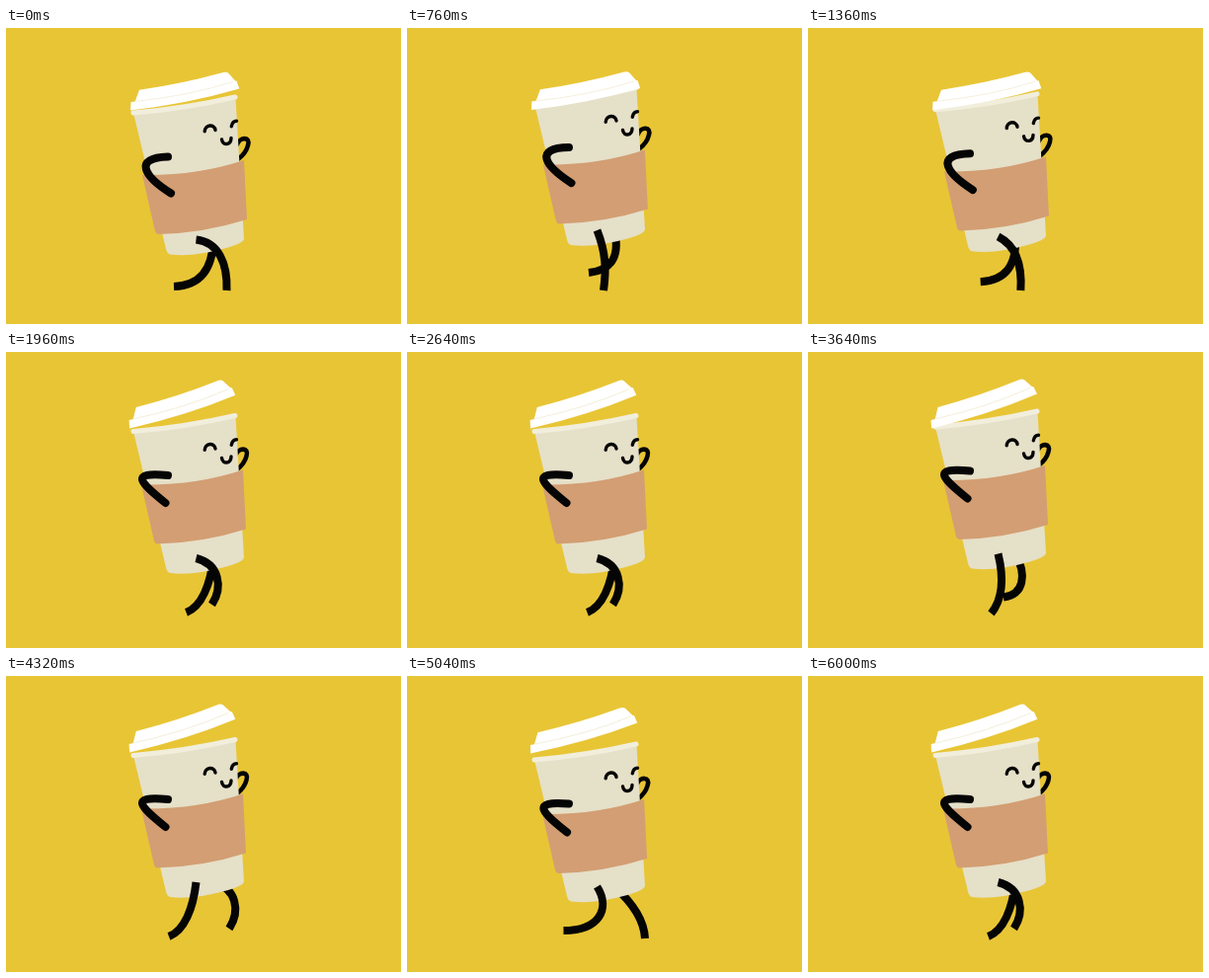
Write an HTML page that moves like this. It is 400 px wide and 300 px high and loops after 6.04 s.

```html
<!DOCTYPE html>
<html lang="en">
<head>
<meta charset="utf-8">
<title>Walking cup</title>
<style>
  html, body { margin: 0; width: 100%; height: 100%; overflow: hidden; background: #e8c535; }
  svg { display: block; width: 100%; height: 100%; }
  .ink { fill: none; stroke: #050505; }
  .leg { stroke-width: 8; }
  .arm { stroke-width: 8; stroke-linecap: round; }
  .far-arm { stroke-width: 4.6; stroke-linecap: round; }
  .face { stroke-width: 3.4; stroke-linecap: round; }
</style>
</head>
<body>
<svg viewBox="0 0 400 300">
  <rect width="400" height="300" fill="#e8c535"/>
  <path id="farLeg" class="ink leg"/>
  <path id="farArm" class="ink far-arm" d="M234 118C237 110 248 110 245 119Q243 127 235 133"/>
  <g id="cup">
    <path fill="#e5e0c8" d="M129 86Q182 83 232.500 71L241 214Q240 218 225 222.500Q190 232.500 166 229.500Q163 228.500 162 224Z"/>
    <path fill="none" stroke="#f1eedc" stroke-width="5" stroke-linecap="round" d="M129 86Q182 81.500 232 70"/>
    <g class="ink face">
      <path d="M201.200 104.800C201.500 97.500 211 97 212 103.500"/>
      <path d="M228.300 99.800Q229.300 94.300 233.500 94.300"/>
      <path d="M218.500 113C219.500 119.500 227.800 119 228 111.500"/>
    </g>
  </g>
  <path id="sleeve" fill="#d39e73" d="M138 149Q192 150 241 134L244 194Q200 208 154 209Q152 209 151 206Z"/>
  <g id="lid">
    <path fill="#fff" d="M130.500 75L135 62.800Q178 56.500 219 45.200Q223 44 225 45.500L233 54.500L232 57Q184 72 130.500 77Z"/>
    <path fill="#fff" d="M126.500 75Q184 70 233.500 53.500L236.300 61.500Q185 76.500 126 83.500Z"/>
    <path fill="none" stroke="#f1ebd2" stroke-width=".8" d="M130 74.500Q184 69 230 54.500"/>
  </g>
  <path id="arm" class="ink arm"/>
  <path id="nearLeg" class="ink leg"/>
</svg>
<script>
const TICK = 40, LOOP = 6040, CYCLE = 20, LAST = 179;
const HIP_NEAR = 192.5, HIP_FAR = 210;

// body: rise, looseness of sleeve and arms, lid angle, lid rise
// legs: two control points and the foot; x from the hip, y on the stage
const POSES = {
  contact: { body: [0, 0, 0, 0],
    lead: [23, 217, 32, 239, 31, 266], other: [-1, 246, -14, 261, -40, 262] },
  rise: { body: [-9.5, .1, 0, -.5],
    lead: [9, 228, 9.5, 245, 6.5, 266], other: [7, 236, -7, 246, -26, 248] },
  top: { body: [-10, 1, -6.8, -6],
    lead: [5, 225, 6.5, 248, -7, 265], other: [12, 226, 8.5, 246, -12, 248.5] },
  fall: { body: [-5.5, 1, -6.2, -6],
    lead: [-3, 236, -12, 258, -27.5, 264], other: [23.5, 215, 27.5, 238, 16, 256] },
  reach: { body: [-1, .9, -4.7, -5],
    lead: [14, 236, 2, 258, -34, 258], other: [14, 226, 30, 245, 31, 266] }
};

// step in the cycle, pose, whether the near leg leads
const STEPS = [
  [0, 'contact', true], [3, 'rise', true], [9, 'top', true],
  [10, 'fall', true], [11, 'reach', true],
  [12, 'contact', false], [14, 'rise', false], [18, 'top', false],
  [19, 'fall', false], [20, 'contact', true]
].map(([at, name, nearLeads]) => {
  const { body, lead, other } = POSES[name];
  return { at, body, near: nearLeads ? lead : other, far: nearLeads ? other : lead };
});

const byId = id => document.getElementById(id);
const set = (id, name, value) => byId(id).setAttribute(name, value);
const mix = (a, b, u) => a.map((v, i) => v + (b[i] - v) * u);

function poseAt(step) {
  const i = STEPS.findIndex(s => s.at > step);
  const a = STEPS[i - 1], b = STEPS[i];
  const u = (step - a.at) / (b.at - a.at);
  return { body: mix(a.body, b.body, u), near: mix(a.near, b.near, u), far: mix(a.far, b.far, u) };
}

function curve(x, y, pts, baseY) {
  const rest = pts.map((v, i) => v + (i % 2 ? baseY : x));
  return `M${x} ${y}C${rest.join(' ')}`;
}

function draw(time) {
  const tick = Math.floor(time % LOOP / TICK);
  const step = Math.min(LAST, Math.round(tick * 1.2)) % CYCLE;
  const { body: [dy, loose, tilt, lift], near, far } = poseAt(step);
  const hipY = 214.5 + dy;

  set('cup', 'transform', `translate(0 ${dy})`);
  set('sleeve', 'transform', `translate(${-loose} ${dy - 9 * loose})`);
  set('lid', 'transform', `translate(${-loose} ${lift}) rotate(${tilt} 126 83)`);
  set('farArm', 'transform', `translate(${-1.5 * loose} ${dy - 8 * loose})`);

  const armY = 130.5 + dy;
  const bend = mix([-36, 1, -24, 20, 3, 37], [-41, -4, -27, 8, -2.5, 28], loose);
  set('arm', 'd', curve(164, armY, bend, armY));
  set('nearLeg', 'd', curve(HIP_NEAR, hipY, near, 0));
  set('farLeg', 'd', curve(HIP_FAR, hipY, far, 0));
}

function frame() {
  draw(performance.now());
  requestAnimationFrame(frame);
}
frame();
</script>
</body>
</html>
```
